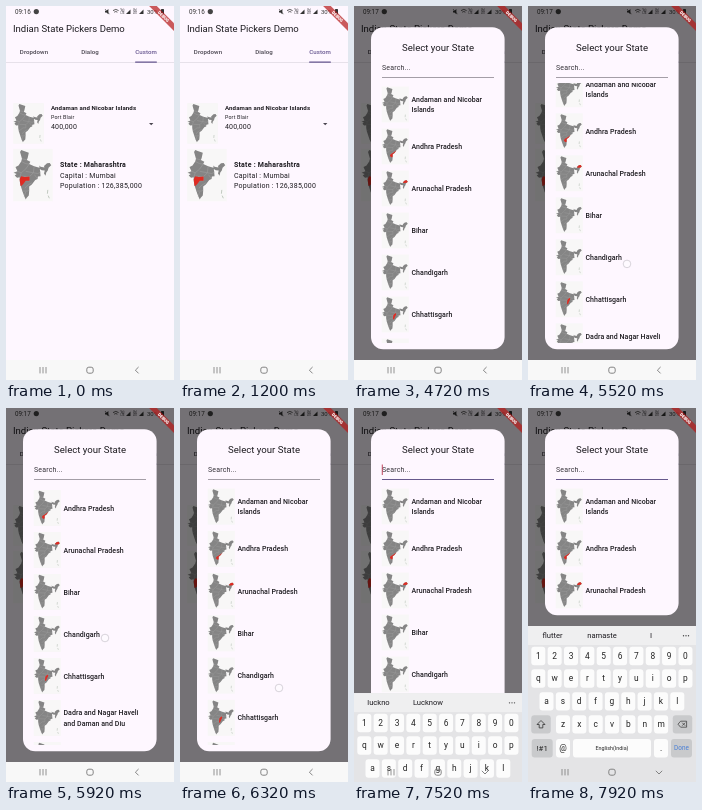
An HTML page for the animation above (8000 ms loop, 168 px wide and 374 px high).

```html
<!DOCTYPE html>
<html lang="en">
<head>
<meta charset="utf-8">
<title>Indian State Pickers Demo</title>
<style>
  html, body { margin: 0; width: 100%; height: 100%; overflow: hidden; background: #fef7ff; }
  svg { display: block; width: 168px; height: 374px; font-family: Roboto, sans-serif; }
</style>
</head>
<body>
<svg id="stage" viewBox="0 0 168 374" xmlns="http://www.w3.org/2000/svg"></svg>
<script>
const LOOP = 8000;
const INK = '#1d1b20', MUTED = '#49454f', ACCENT = '#65558f', SURFACE = '#fef7ff';

const text = (x, y, size, str, attrs = '') =>
  `<text x="${x}" y="${y}" font-size="${size}" fill="${INK}" ${attrs}>${str}</text>`;
const centered = (x, y, size, str, attrs = '') => text(x, y, size, str, `text-anchor="middle" ${attrs}`);
const rect = (x, y, w, h, fill, attrs = '') =>
  `<rect x="${x}" y="${y}" width="${w}" height="${h}" fill="${fill}" ${attrs}/>`;
const line = (d, color, width, attrs = '') =>
  `<path d="${d}" fill="none" stroke="${color}" stroke-width="${width}" ${attrs}/>`;

// Map of India in a 100 x 130 box, with optional highlighted state
const regions = {
  maharashtra: 'M16 77L20 69 29 71 42 70 42 81 32 81 25 90 20 95 18 94Z',
  andhra: 'M30 101L34 95 40 92 56 81 48 91 41 96 41 106 36 108Z',
  arunachal: 'M80 43L88 35 95 34 99 40 95 44 86 45Z',
  chhattisgarh: 'M44 68L52 60 55 65 49 77 46 86 42 82Z'
};
const india = (x, y, scale, region) => `<g transform="translate(${x} ${y}) scale(${scale})">
  ${rect(-1, -3, 104, 138, '#f8f7f7')}
  <path fill="#858585" d="M20 0L40 7 37 21 35 26 44 31 41 37 54 43 68 47 68 41 71 44 81 46 80 42 88 35 95 34 99 40 92 47 90 54 86 59 84 68 80 62 82 54 74 53 69 50 70 58 71 69 64 70 63 76 57 79 48 91 41 96 41 108 40 120 34 126 32 130 28 122 23 108 18 92 16 81 16 72 9 73 3 67 8 63 0 60 10 56 5 45 13 41 20 30 22 23 20 16 17 5Z"/>
  ${line('M22 23L35 26M20 30L32 36 41 37M10 56L20 60 32 50 41 37M16 72L20 60M20 69L42 70 52 60 32 56M54 43L52 60 64 62 71 58M55 65L63 76M42 81L42 70M18 92L32 81 42 81M30 101L34 95 48 86M23 108L36 108 41 106M28 122L32 110', '#a6a6a6', 1.2)}
  ${line('M90 105L89 115M91 120L94 127', '#9cab9c', 1.6)}
  ${region ? `<path d="${regions[region]}" fill="#df2b22"/>` : ''}
</g>`;

function statusBar() {
  const bars = x => `<path d="M${x} 8h4.5v-4.5z" fill="#333"/>`;
  return `<text id="clock" x="9" y="7.9" font-size="6.3" fill="#333"></text>
    <circle cx="30.3" cy="5.6" r="2.6" fill="#444"/>
    <path d="M99 4.8h1.4l2-1.8v5.2l-2-1.8H99z" fill="#333"/>` +
    line('M99 3l4.4 5.2', '#333', .6) +
    line('M107 4.6q2.8-2.4 5.6 0M108.2 6.2q1.6-1.4 3.2 0', '#333', .8) +
    text(114.5, 5.4, 2.6, 'Vo)') + text(114.5, 8.2, 2.6, 'LTE') + bars(120) +
    text(127, 5.4, 2.6, 'Vo)') + text(127, 8.2, 2.6, 'LTE') + bars(133) +
    text(141, 7.8, 6, '30%', 'style="fill:#333"') + rect(155, 3, 3, 5.4, '#333', 'rx=".6"');
}

function page() {
  const tab = (x, label, color) =>
    centered(x, 48.2, 6.125, label, `font-weight="500" letter-spacing=".06" style="fill:${color}"`);
  const spaced = 'letter-spacing=".22"';
  return rect(0, 0, 168, 374, SURFACE) +
    text(7, 26, 9.55, 'Indian State Pickers Demo') +
    tab(28, 'Dropdown', MUTED) + tab(84, 'Dialog', MUTED) + tab(140, 'Custom', ACCENT) +
    rect(0, 56.3, 168, .45, '#cac4d0') +
    rect(129, 55.4, 22, 1.3, ACCENT, 'rx=".6"') +
    india(7.5, 98, .295) +
    text(45, 104.4, 6.125, 'Andaman and Nicobar Islands', 'font-weight="700" letter-spacing=".11"') +
    text(45, 113, 5.25, 'Port Blair', 'letter-spacing=".17"') +
    text(45, 122.6, 7, '400,000', 'letter-spacing=".15"') +
    '<path d="M143 117h4.4l-2.2 2.2z" fill="#49454f"/>' +
    india(7.6, 144, .38, 'maharashtra') +
    text(54, 161.4, 7, 'State : Maharashtra', `font-weight="700" ${spaced}`) +
    text(54, 171.9, 7, 'Capital : Mumbai', spaced) +
    text(54, 182.3, 7, 'Population : 126,385,000', spaced);
}

const states = [
  ['Andaman and Nicobar|Islands'], ['Andhra Pradesh', 'andhra'], ['Arunachal Pradesh', 'arunachal'],
  ['Bihar'], ['Chandigarh'], ['Chhattisgarh', 'chhattisgarh'],
  ['Dadra and Nagar Haveli|and Daman and Diu'], ['Delhi']
];

function dialog() {
  const items = states.map(([name, region], i) => {
    const y = 98.5 + 42 * i, lines = name.split('|');
    return india(28, y - 17.2, .26, region) + lines.map((part, n) =>
      text(57.5, y + 2.5 + 10.5 * (n - (lines.length - 1) / 2), 7, part,
        'font-weight="500" letter-spacing=".05"')).join('');
  }).join('');
  return `<g id="dialog">
    ${rect(0, 0, 168, 354, '#000', 'opacity=".54"')}
    ${rect(17, 21.2, 133.6, 322, SURFACE, 'rx="12.2" id="panel"')}
    ${centered(84, 44.8, 9.625, 'Select your State')}
    ${text(28, 64, 7, 'Search...', 'letter-spacing=".17" style="fill:#333037"')}
    <rect id="underline" x="28" width="112"/>
    ${rect(27.8, 56.5, .9, 10.5, '#b8324a', 'id="caret"')}
    <clipPath id="listClip">${rect(17, 77, 134, 260, '#000', 'id="listArea"')}</clipPath>
    <g clip-path="url(#listClip)"><g id="list">${items}</g></g>
  </g>`;
}

function keyboard() {
  const key = (x, y, w, label, { fill = '#fcfcfc', size = 8.4, color = '#222' } = {}) =>
    rect(x - w / 2, y - 9, w, 18.4, fill, 'rx="3"') +
    centered(x, y + size * .35, size, label, `style="fill:${color}"`);
  const row = (chars, x, y) => [...chars].map((c, i) => key(x + 16.35 * i, y, 14, c)).join('');
  const dark = { fill: '#c9cacc' };
  return `<g id="keyboard">
    ${rect(0, 218, 168, 156, '#e4e4e6')}${rect(0, 218, 168, 19, '#efeff0')}
    ${['w0', 'w1', 'w2'].map((id, i) => centered([24.5, 74, 123][i], 230.2, 7.6, '', `id="${id}"`)).join('')}
    ${[155.5, 158, 160.5].map(x => `<circle cx="${x}" cy="227.8" r=".7" fill="#444"/>`).join('')}
    ${row('1234567890', 10.3, 247.8)}${row('qwertyuiop', 10.3, 270.3)}
    ${row('asdfghjkl', 18.5, 293.2)}${row('zxcvbnm', 35, 316.2)}
    ${key(13, 316.2, 19.5, '', dark)}${key(154.5, 316.2, 19.5, '', dark)}
    ${line('M13 312.5l-4 4h2.2v3.4h3.6v-3.4H17z', '#333', .8)}
    ${line('M150 316.2l2.6-3h6v6h-6zM154.2 314.7l3 3m0-3l-3 3', '#333', .7)}
    ${key(14.2, 340, 21, '!#1', { ...dark, size: 7.8 })}${key(35, 340, 14, '@')}
    ${key(84, 340, 78, 'English(India)', { size: 5.4 })}${key(133, 340, 14, '.')}
    ${key(153.5, 340, 21, 'Done', { ...dark, size: 6.4, color: '#4a7fd6' })}
  </g>`;
}

const navigation = () => line('M34 361v6.4M37 361v6.4M40 361v6.4', '#777', .8) +
  rect(80.8, 361.2, 6.4, 6, 'none', 'rx="2" stroke="#777" stroke-width=".9"') +
  line('M132.6 361l-3.2 3.2 3.2 3.2', '#777', .9, 'id="back"') +
  line('M127.8 362.8l3.2 3.2 3.2-3.2', '#777', .9, 'id="hide"');

const banner = () => `<g transform="translate(168 0) rotate(45)">
  ${rect(-20, 12.2, 40, 5.4, '#b71c1c', 'opacity=".72"')}
  ${centered(0, 16.4, 4.3, 'DEBUG', 'font-weight="900" style="fill:#fff"')}</g>`;

const stage = document.getElementById('stage');
stage.innerHTML = page() + statusBar() + dialog() + rect(0, 354, 168, 20, '#f8f8f8') +
  keyboard() + navigation() + banner() +
  '<circle id="touch" r="3.8" fill="#fff" fill-opacity=".4" stroke="#8b8790" stroke-opacity=".55" stroke-width=".6"/>';

const el = Object.fromEntries([...stage.querySelectorAll('[id]')].map(n => [n.id, n]));
const set = (id, attrs) => Object.entries(attrs).forEach(([k, v]) => el[id].setAttribute(k, v));
const show = (id, on) => set(id, { visibility: on ? 'visible' : 'hidden' });
const clamp = (v, lo = 0, hi = 1) => Math.min(hi, Math.max(lo, v));
const easeOut = p => 1 - (1 - p) ** 2;

// Eased interpolation through [time, value] points
function track(t, points) {
  if (t <= points[0][0]) return points[0][1];
  for (let i = 1; i < points.length; i++) {
    const [t0, a] = points[i - 1], [t1, b] = points[i];
    if (t < t1) {
      const p = (t - t0) / (t1 - t0);
      return a + (b - a) * p * p * (3 - 2 * p);
    }
  }
  return points[points.length - 1][1];
}

const touches = [
  { from: 3120, to: 3560, x: 104, y: () => 167.5 },
  { from: 5200, to: 6480, x: 99, y: t => track(t, [[5240, 279], [5860, 230], [5960, 230], [6320, 280], [6480, 286]]) },
  { from: 6960, to: 7040, x: 121, y: () => 57 }
];

function render(t) {
  el.clock.textContent = t < 2240 ? '09:16' : '09:17';

  const touch = touches.find(p => t >= p.from && t < p.to);
  show('touch', touch);
  if (touch) set('touch', { cx: touch.x, cy: touch.y(t) });

  set('dialog', { opacity: easeOut(clamp((t - 3560) / 320)) });
  const scroll = track(t, [[5280, 0], [5860, 40.5], [5960, 40.5], [6260, 0]]);
  const stretch = track(t, [[6240, 1], [6340, 1.0065], [6480, 1.009], [6860, 1]]);
  set('list', { transform: `translate(0 ${77 - scroll}) scale(1 ${stretch}) translate(0 -77)` });

  const focused = t >= 7200;
  set('underline', { y: focused ? 71 : 71.3, height: focused ? .9 : .5, fill: focused ? '#55477f' : MUTED });
  show('caret', focused && t < 7700);

  const shrink = 136 * track(t, [[7540, 0], [7800, 1]]);
  set('panel', { height: 322 - shrink });
  set('listArea', { height: 260 - shrink });

  const drop = 67.5 * (1 - easeOut(clamp((t - 7520) / 300)));
  show('keyboard', t >= 7520);
  set('keyboard', { transform: `translate(0 ${drop})` });
  const words = t < 7760 ? ['luckno', 'Lucknow', ''] : ['flutter', 'namaste', 'I'];
  words.forEach((word, i) => { el['w' + i].textContent = word; });
  show('back', t < 7360);
  show('hide', t >= 7360);
}

const start = performance.now();
function frame() {
  render((performance.now() - start) % LOOP);
  requestAnimationFrame(frame);
}
render(0);
requestAnimationFrame(frame);
</script>
</body>
</html>
```
